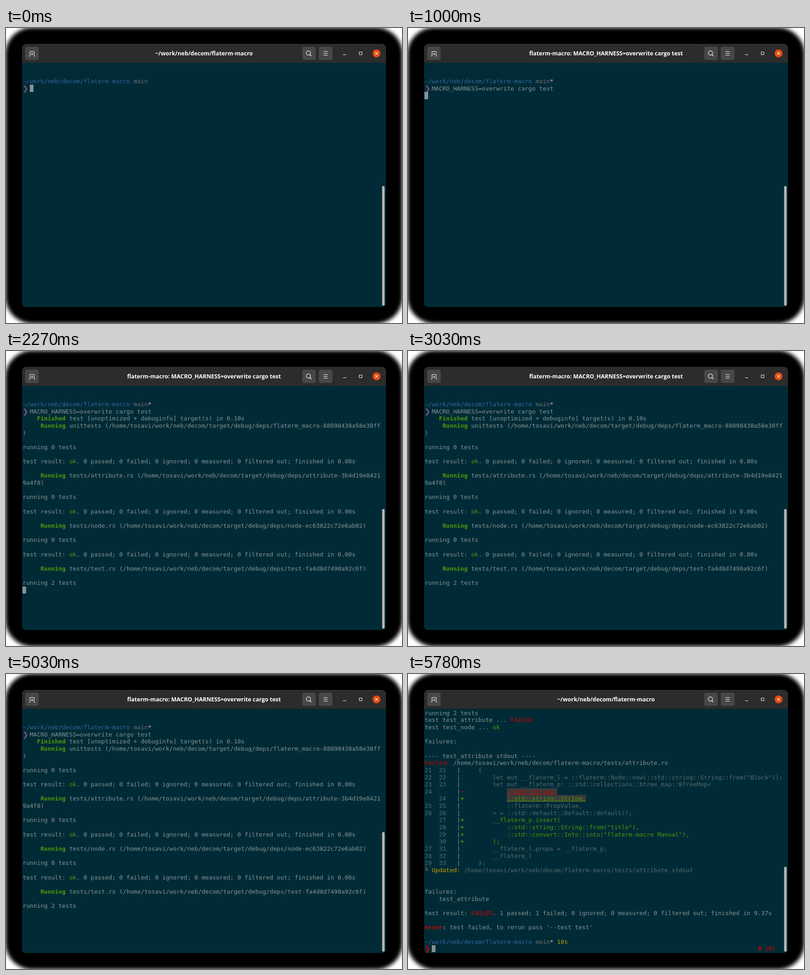
Recreate the animation shown at these times as an HTML page. Size 866 by 646 pixels, loop 8.03 s.

```html
<!DOCTYPE html>
<html lang="en">
<head>
<meta charset="utf-8">
<title>Terminal</title>
<style>
  html, body { margin: 0; width: 100%; height: 100%; overflow: hidden; background: #fff; }
  svg, pre, #cursor { position: absolute; margin: 0; }
  svg { left: 0; top: 0; }
  #title { font: bold 12.4px "Open Sans", sans-serif; fill: #fff; text-anchor: middle; }
  #screen { left: 36.4px; top: 77.6px; color: #839496;
            font: 13px/15.65px "DejaVu Sans Mono", monospace; }
  #cursor { width: 8px; height: 15.6px; background: #839496; }
  .blue { color: #3465a4; }
  .branch { color: #6c6c6c; }
  .star { color: #ffafd7; }
  .purple { color: #8a4f80; }
  .green { color: #4e9a06; }
  .red { color: #cc0000; }
  .yellow { color: #c4a000; }
  .dim { color: #566a6e; }
  .mark { background: #383b3b; text-decoration: underline; }
  .cell { display: inline-block; width: .602em; font-family: "DejaVu Sans", sans-serif; }
  .arrow { font-weight: bold; transform: scale(1.2); transform-origin: left; }
</style>
</head>
<body>
<svg width="866" height="646" fill="none" stroke="#fff">
  <g stroke="none">
    <rect x="-1" y="-1" width="868" height="648" rx="58" fill="#000" style="filter:blur(4px)"/>
    <rect x="35" y="35" width="796" height="576" rx="9" fill="#3b3b3b"/>
    <rect x="35" y="36" width="796" height="575" rx="9" fill="#2c2c2c"/>
    <path d="M35 76H831V602a9 9 0 0 1-9 9H44a9 9 0 0 1-9-9Z" fill="#002b36"/>
    <g fill="#474747">
      <rect x="42" y="41" width="29.5" height="29" rx="4"/>
      <rect x="648" y="41" width="29.5" height="29" rx="4"/>
      <rect x="684" y="41" width="30" height="29" rx="4"/>
    </g>
    <circle cx="810.3" cy="55.5" r="8.7" fill="#e2490f"/>
    <rect id="thumb" x="822.5" width="5.5" rx="2.7" fill="#b3b6b4"/>
    <text id="title" x="433" y="60"></text>
  </g>
  <path d="M50.5 61.5h2V51.5h9v10h2M57 54.5v5M54.5 57h5"/>
  <circle cx="661.3" cy="54.8" r="4.6" stroke-width="1.2"/>
  <path d="M664.7 58.2l3.3 3.3" stroke-width="1.4"/>
  <path d="M694.5 51.5h9M694.5 55.5h9M694.5 59.5h9M737 58.5h7M772.5 52.5h6v6h-6z"/>
  <path d="M807.2 52.4l6.2 6.2M813.4 52.4l-6.2 6.2" stroke-width="1.3"/>
</svg>
<pre id="screen"></pre>
<div id="cursor"></div>
<script>
const $ = id => document.getElementById(id);
const ink = (style, text) => `<span class="${style}">${text}</span>`;
const green = text => ink("green", text);
const red = text => ink("red", text);
const dim = text => ink("dim", text);

const home = "/home/tosavi/work/neb/decom";
const deps = home + "/target/debug/deps/";
const cwd = "~/work/neb/decom/flaterm-macro";
const command = "MACRO_HARNESS=overwrite cargo test";

const prompt = (star, arrow = "purple", extra = "") =>
  `${ink("blue", cwd)} ${ink("branch", "main")}${star ? ink("star", "*") : ""}${extra}\n` +
  ink(arrow + " cell arrow", "❯") + " ";

const status = (word, pad) => " ".repeat(pad) + `<b>${green(word)}</b> `;
const running = text => status("Running", 5) + text + "\n";
const result = (verdict, passed, failed, time) =>
  `test result: ${verdict}. ${passed} passed; ${failed} failed; 0 ignored; 0 measured; ` +
  `0 filtered out; finished in ${time}s\n\n`;
const emptyRun = "\nrunning 0 tests\n\n" + result(green("ok"), 0, 0, "0.00");

const idle = "\n\n" + prompt(false);
const dirty = "\n\n" + prompt(true);
const typed = dirty + command;
const testing = typed + "\n" +
  status("Finished", 4) + "test [unoptimized + debuginfo] target(s) in 0.10s\n" +
  running(`unittests (${deps}flaterm_macro-88898438a58e38ff\n)`) + emptyRun +
  running(`tests/attribute.rs (${deps}attribute-3b4d19e8421\n9a4f8)`) + emptyRun +
  running(`tests/node.rs (${deps}node-ec63822c72e6ab02)`) + emptyRun +
  running(`tests/test.rs (${deps}test-fa4d8d7490a92c6f)`) + "\nrunning 2 tests";

// One diff row: old and new line numbers, sign, indent and code.
function diff(before, after, sign, indent, code, mark = "") {
  const style = { "+": "green", "-": "red" }[sign] || "dim";
  const numbers = String(before).padEnd(4) + String(after).padEnd(5);
  return dim(numbers) + "|" + `<b>${ink(style, sign)}</b>` +
    " ".repeat(indent) + ink(style + " " + mark, code) + "\n";
}

const failed = `running 2 tests
test test_attribute ... ${red("FAILED")}
test test_node ... ${green("ok")}

failures:

---- test_attribute stdout ----
${red("Failed:")} ${home}/flaterm-macro/tests/attribute.rs
` +
  diff(21, 21, " ", 4, "{") +
  diff(22, 22, " ", 8, 'let mut __flaterm_l = ::flaterm::Node::new(::std::string::String::from("Block"));') +
  diff(23, 23, " ", 8, "let mut __flaterm_p: ::std::collections::btree_map::BTreeMap&lt;") +
  diff(24, "", "-", 12, "::std::String,", "mark") +
  diff("", 24, "+", 12, "::std::string::String,", "mark") +
  diff(25, 25, " ", 12, "::flaterm::PropValue,") +
  diff(26, 26, " ", 8, "&gt; = ::std::default::Default::default();") +
  diff("", 27, "+", 8, "__flaterm_p.insert(") +
  diff("", 28, "+", 12, '::std::string::String::from("title"),') +
  diff("", 29, "+", 12, '::std::convert::Into::into("flaterm-macro Manual"),') +
  diff("", 30, "+", 8, ");") +
  diff(27, 31, " ", 8, "__flaterm_l.props = __flaterm_p;") +
  diff(28, 32, " ", 8, "__flaterm_l") +
  diff(29, 33, " ", 4, "};") +
  `${ink("yellow", "└ Updated:")} ${dim(home + "/flaterm-macro/tests/attribute.stdout")}


failures:
    test_attribute

` + result(red("FAILED"), 1, 1, "9.37") +
  `<b>${red("error")}:</b> test failed, to rerun pass '--test test'\n\n` +
  prompt(true, "red", ink("yellow", " 10s")) +
  " ".repeat(91) + ink("red cell", "✘") + red(" 101");

// Each scene: start time, screen, cursor column and row, title, top of the scroll thumb.
const busy = "flaterm-macro: " + command;
const scenes = [
  [0, idle, 2, 3, cwd, 346],
  [250, dirty, 2, 3, cwd, 346],
  [500, typed, 36, 3, cwd, 346],
  [1000, typed, 0, 4, busy, 346],
  [1250, testing, 0, 28, busy, 346],
  [5280, failed, 2, 33, cwd, 422],
];
const ticks = [0, 250, 500, 750, 1000, 1250, 1510, 1760, 2010, 2270, 2530, 2780, 3030,
  3280, 3530, 3780, 4030, 4280, 4530, 4780, 5030, 5280, 5530, 5780];
const loop = 8030;
let shown;

function show([, text, col, row, title, thumbTop]) {
  $("screen").innerHTML = text;
  $("title").textContent = title;
  $("cursor").style.left = 36.4 + col * 7.826 + "px";
  $("cursor").style.top = 77.4 + row * 15.65 + "px";
  $("thumb").setAttribute("y", thumbTop);
  $("thumb").setAttribute("height", 608 - thumbTop);
}

function draw() {
  const time = performance.now() % loop;
  const scene = scenes.findLast(([start]) => start <= time);
  if (scene !== shown) show(shown = scene);
  // The blink flips at every tick and restarts when the output arrives.
  const tick = ticks.findLastIndex(start => start <= time);
  const lit = tick < 5 ? tick % 2 === 0 : tick % 2 === 1;
  $("cursor").style.visibility = lit ? "visible" : "hidden";
  requestAnimationFrame(draw);
}
draw();
</script>
</body>
</html>
```
